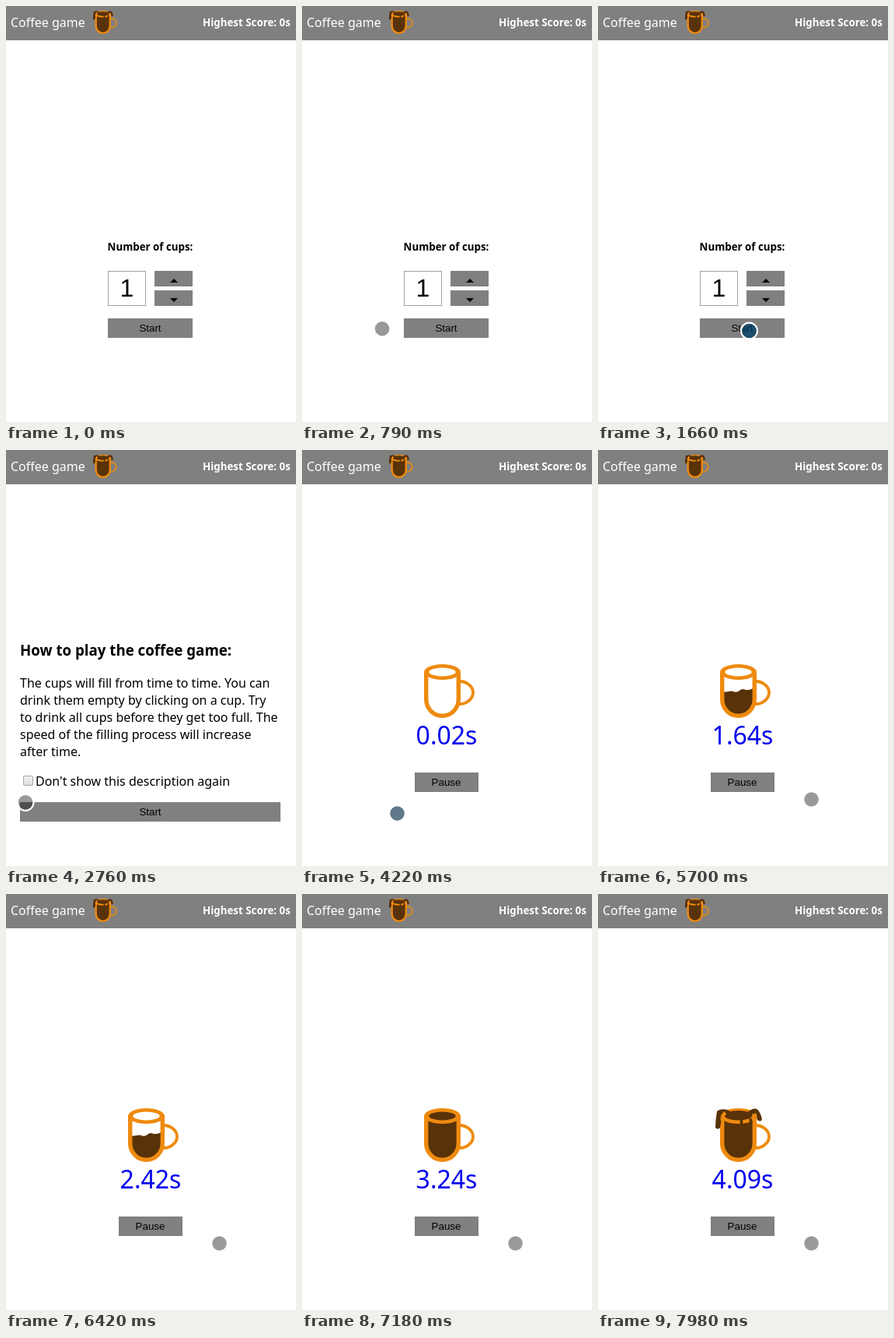
These frames come from a looping animation (373 by 534 pixels, 8000 ms). An HTML page:

```html
<!DOCTYPE html>
<html lang="en">
<head>
<meta charset="utf-8">
<title>Coffee game</title>
<style>
  html, body { margin: 0; width: 100%; height: 100%; overflow: hidden; background: #fff; }
  svg { display: block; width: 373px; height: 534px; }
  text { font: 16px "Noto Sans", sans-serif; white-space: pre; }
  .mid { text-anchor: middle; }
  .bold { font-weight: 700; font-size: 13.333px; }
  .btn { font: 13.333px "Liberation Sans", Arial, sans-serif; text-anchor: middle; }
  .grey { fill: #808080; }
  .brew { fill: #583209; }
  .glaze { fill: #ee8a0e; }
  .line { fill: none; stroke: #ee8a0e; }
</style>
</head>
<body>
<svg viewBox="0 0 373 534" xmlns="http://www.w3.org/2000/svg">
  <defs>
    <linearGradient id="box" x2="0" y2="1">
      <stop stop-color="#f2f2f2"/><stop offset="1" stop-color="#dedede"/>
    </linearGradient>
    <path id="inside" d="M160 285V320A20.500 21 0 0 0 201 320V285Z"/>
    <clipPath id="bowl"><use href="#inside"/></clipPath>
    <g id="shell">
      <path class="line" stroke-width="3.800" d="M203 297C211 297 220 303 220 311.500S211 326 203 326"/>
      <path class="line" stroke-width="5.400" d="M159.700 285V320A20.800 21.300 0 0 0 201.300 320V285"/>
      <ellipse class="glaze" cx="180.500" cy="285" rx="23.500" ry="10"/>
    </g>
    <g id="cup-empty">
      <use href="#shell"/>
      <ellipse fill="#fff" cx="180.500" cy="285" rx="17.200" ry="5.400"/>
    </g>
    <g id="cup-half">
      <path class="brew" clip-path="url(#bowl)" d="M158 309C163 313 169 308 174 310Q179 312 183 308Q187 306 190 308Q196 308 199 306L204 307V346H158Z"/>
      <use href="#cup-empty"/>
    </g>
    <g id="cup-full">
      <use href="#inside" class="brew"/>
      <use href="#shell"/>
      <ellipse class="brew" cx="180.500" cy="285" rx="17.200" ry="5.400"/>
    </g>
    <g id="cup-over">
      <use href="#cup-full"/>
      <ellipse class="brew" cx="180.500" cy="284" rx="18" ry="6"/>
      <path class="brew" d="M170 279C163 275 157 276 153 279Q151 290 151 300Q154 303 157 300L159 288Q164 283 171 284Z"/>
      <path class="brew" d="M190 283Q196 275 203 275.500Q209 278 211 290Q208 293 205 290Q203 283 199 282L193 286Z"/>
      <path class="line" stroke-width="4.500" d="M160 291Q159 284 164 281M199 291Q204 288 201 282"/>
      <path fill="none" stroke="#583209" stroke-width="3.500" d="M184.500 287V297M196 288L197 294"/>
    </g>
  </defs>

  <rect class="grey" width="373" height="44"/>
  <text x="6" y="27" fill="#fff">Coffee game</text>
  <use href="#cup-over" transform="translate(46.200 -113.600) scale(.435)"/>
  <text class="bold" x="253" y="26" fill="#fff">Highest Score: 0s</text>

  <g id="menu">
    <text class="bold mid" x="185.500" y="314">Number of cups:</text>
    <rect x="131.500" y="340.500" width="48" height="44" fill="#fff" stroke="#a0a0a0"/>
    <text class="btn" x="155.500" y="373" style="font-size:32px">1</text>
    <path class="grey" d="M191 340h49v20h-49zM191 365h49v20h-49zM131 401h109v25h-109z"/>
    <path d="M211 355L216 350L221 355ZM211 375L216 380L221 375Z"/>
    <text class="btn" x="185.500" y="418">Start</text>
  </g>

  <g id="help">
    <text x="18" y="264" style="font-weight:700;font-size:18.720px">How to play the coffee game:</text>
    <text x="18" y="305">The cups will fill from time to time. You can</text>
    <text x="18" y="327">drink them empty by clicking on a cup. Try</text>
    <text x="18" y="349">to drink all cups before they get too full. The</text>
    <text x="18" y="371">speed of the filling process will increase</text>
    <text x="18" y="393">after time.</text>
    <rect x="22.500" y="418.500" width="12" height="12" rx="1.500" fill="url(#box)" stroke="#a6a6a6"/>
    <text x="38" y="431">Don't show this description again</text>
    <rect class="grey" x="18" y="452" width="335" height="25"/>
    <text class="btn" x="185.500" y="469">Start</text>
  </g>

  <g id="game">
    <use id="cup"/>
    <text id="clock" class="mid" x="186" y="378" fill="#00e" style="font-size:32px"></text>
    <rect class="grey" x="145" y="414" width="82" height="25"/>
    <text class="btn" x="185.500" y="431">Pause</text>
  </g>

  <g id="pointer">
    <circle r="10.400" fill="none" stroke="#fff" stroke-width="2.200"/>
    <circle id="dot" r="9.300"/>
  </g>
</svg>
<script>
  const LOOP = 8000, FRAME = 40;
  const PRESS = 1660, HELP = 1700, PLAY = 4220;
  const $ = id => document.getElementById(id);

  // Each move eases along one bend, from where the last one ended.
  const entry = [383, 408];
  const moves = [
    { from: 210, to: 990, bend: [-125, 444], end: [184, 402.5] },
    { from: 1020, to: 1460, bend: [188, 408], end: [194.5, 417] },
    { from: HELP, to: 2760, bend: [60, 395], end: [25, 452.5] },
    { from: 3260, to: 3820, bend: [50, 405], end: [122.5, 466.5] },
    { from: PLAY, to: 5000, bend: [180, 489], end: [274.5, 448.5] }
  ];
  const levels = ["empty", "half", "full", "over"];

  const clamp = v => Math.max(0, Math.min(1, v));
  const mix = (a, b, k) => a + (b - a) * k;
  const ease = k => (1 - Math.cos(Math.PI * k)) / 2;
  const bezier = (a, b, c, k) => mix(mix(a, b, k), mix(b, c, k), k);

  function pointerAt(t) {
    let at = entry;
    for (const { from, to, bend, end } of moves) {
      if (t < from) break;
      const k = ease(clamp((t - from) / (to - from)));
      at = at.map((v, axis) => bezier(v, bend[axis], end[axis], k));
    }
    return at;
  }

  // Click glow: jumps up at the press, then fades away.
  const glow = (t, at, peak) => t < at ? 0 : peak * clamp(1 - (t - at) / 350);

  function drawPointer(t) {
    $("pointer").style.display = t < moves[0].from ? "none" : "";
    $("pointer").setAttribute("transform", `translate(${pointerAt(t)})`);
    const g = glow(t, PRESS, 1) + glow(t, PLAY, .65);
    $("dot").setAttribute("fill", `rgba(0,${62 * g},${104 * g},${mix(.4, .75, g)})`);
  }

  function drawGame(t) {
    const s = Math.max(0, t - PLAY) / 1000;
    const time = .02 + s * (1.105 - .006 * s);
    $("clock").textContent = time.toFixed(2) + "s";
    $("cup").setAttribute("href", "#cup-" + levels[Math.trunc((time - .4) / 1.05)]);
  }

  function draw(ms) {
    const t = Math.floor((ms + FRAME / 2) / FRAME) * FRAME - FRAME / 2;
    const screen = t < HELP ? "menu" : t < PLAY ? "help" : "game";
    for (const id of ["menu", "help", "game"]) $(id).style.display = id === screen ? "" : "none";
    drawGame(t);
    drawPointer(t);
  }

  function tick() {
    draw(performance.now() % LOOP);
    requestAnimationFrame(tick);
  }
  tick();
</script>
</body>
</html>
```
